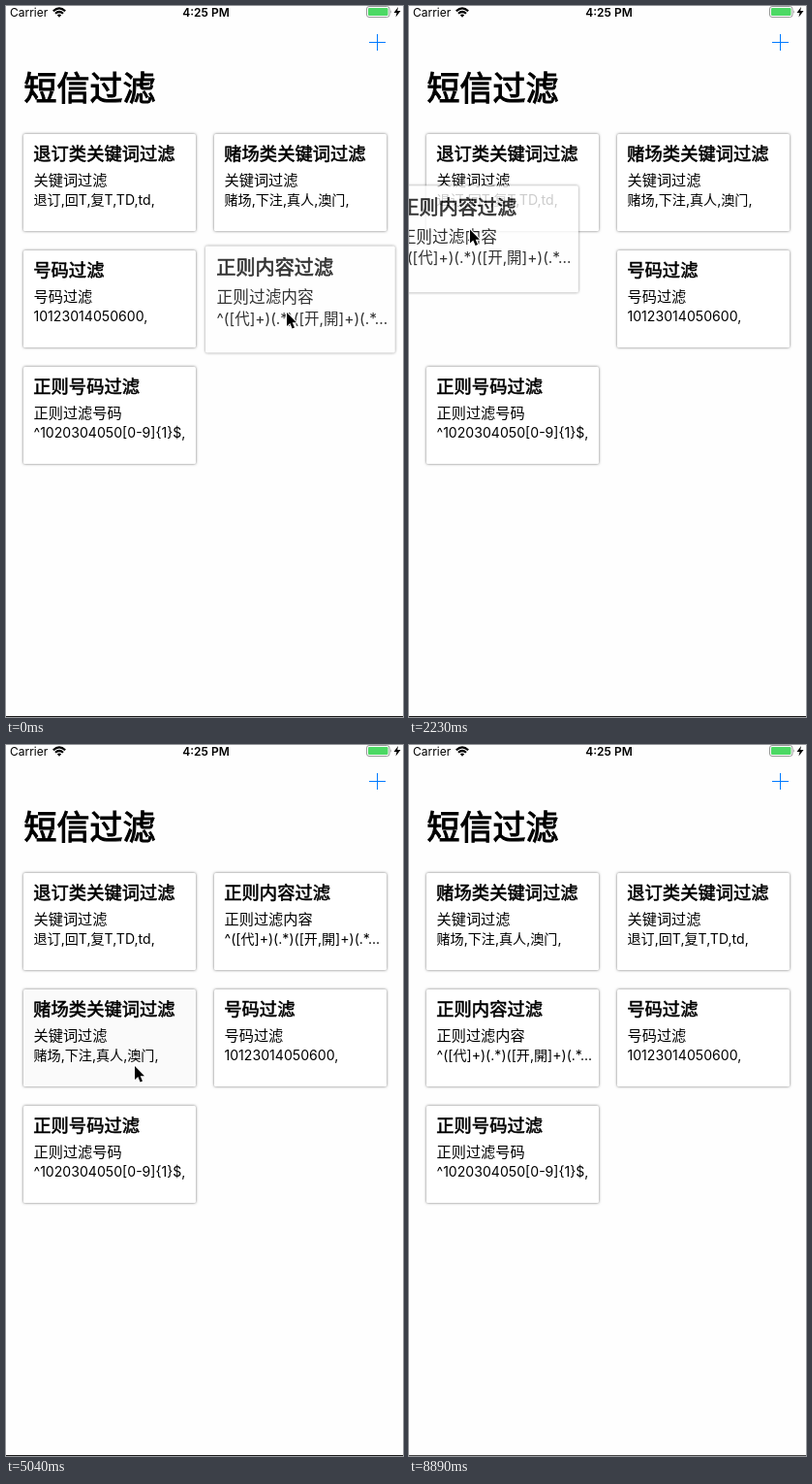
Recreate the animation shown at these times as an HTML page. Size 410x733 px, loop 8990 ms.

```html
<!DOCTYPE html>
<html lang="zh-CN">
<head>
<meta charset="utf-8">
<title>短信过滤</title>
<style>
  html, body { margin: 0; width: 100%; height: 100%; overflow: hidden; background: #fefefe; }
  svg { display: block; width: 410px; height: 733px; }
  text { font-family: Inter, "Noto Sans CJK SC", "Noto Sans CJK", sans-serif; white-space: pre; }
  .status { font-size: 12px; }
  .heading { font-size: 34px; }
  .name { font-size: 18.3px; }
  .kind { font-size: 15.2px; }
  .body { font-size: 14.1px; }
  /* A thin outline gives the medium weight that the CJK font lacks. */
  .heading, .name { stroke: #000; stroke-width: .032em; }
  .card rect { fill: #fff; filter: drop-shadow(0 0 1.6px rgba(0, 0, 0, .55)); }
  .card.pressed rect { fill: #fafafa; }
  .card.lifted { opacity: .8; }
</style>
</head>
<body>
<svg id="stage" viewBox="0 0 410 733">
  <text class="status" x="4" y="10.5">Carrier</text>
  <g fill="none" stroke="#000" stroke-width="2.2">
    <path d="M48.8 5.2Q55 -.6 61.2 5.2M51 7.8Q55 4.2 59 7.8"/>
    <path d="M52.8 9.3Q55 7.6 57.2 9.3L55 11.8Z" fill="#000" stroke="none"/>
  </g>
  <text class="status" x="206.5" y="10.5" text-anchor="middle" font-weight="600">4:25 PM</text>
  <rect x="372.5" y=".5" width="23.5" height="11" rx="2.5" fill="none" stroke="#999"/>
  <rect x="374" y="2" width="20.5" height="8" rx="1.2" fill="#4cd964"/>
  <path d="M397.2 4Q399 6 397.2 8Z" fill="#999"/>
  <path d="M405 1L400.5 7H403.5L402.5 11.5L407.5 5H404.2Z"/>
  <path d="M375 37.5H392M383.5 29V46" stroke="#007aff"/>
  <text class="heading" x="18.5" y="97">短信过滤</text>
  <rect id="edge" y="732" width="410" height="1"/>
  <path id="cursor" d="M0 0V14L3.3 11L5.6 16.5L8 15.5L5.7 10.3H10Z" stroke="#fff" paint-order="stroke" stroke-width="2"/>
</svg>
<script>
const LOOP = 8990, START = 740, REFRESH = 148.15, LAG = 55, SHIFT = 300;
const stage = document.getElementById('stage');
const cursor = document.getElementById('cursor');
const edge = document.getElementById('edge');

const cards = [
  ['退订类关键词过滤', '关键词过滤', '退订,回T,复T,TD,td,'],
  ['赌场类关键词过滤', '关键词过滤', '赌场,下注,真人,澳门,'],
  ['号码过滤', '号码过滤', '10123014050600,'],
  ['正则内容过滤', '正则过滤内容', '^([代]+)(.*)([开,開]+)(.*...'],
  ['正则号码过滤', '正则过滤号码', '^1020304050[0-9]{1}$,']
].map(makeCard);

// Turning points and rests of the pointer.
const pointer = [
  { t: 700, x: 290, y: 316 },
  { t: 1340, x: 262, y: 422 },
  { t: 1640, x: 198, y: 433 },
  { t: 2080, x: 70, y: 295 },
  { t: 2230, x: 63, y: 228 },
  { t: 2640, x: 85, y: 183 },
  { t: 3120, x: 212, y: 248 },
  { t: 3340, x: 284, y: 201 },
  { t: 3700, x: 284, y: 201 },
  { t: 4140, x: 133, y: 331 },
  { t: 6090, x: 133, y: 331 },
  { t: 6640, x: 140, y: 229 },
  { t: 6840, x: 140, y: 229 },
  { t: 7290, x: 229, y: 228 },
  { t: 7440, x: 229, y: 228 },
  { t: 7880, x: 320, y: 668 }
];

const drags = [
  { card: 3, start: 0, end: 3500, dx: -84, dy: -68.5 },
  { card: 1, start: 5040, end: 6800, dx: -124, dy: -84 }
];

// Each move takes one card to a new place in the grid.
const moves = [
  { t: 1890, card: 3, to: 2 },
  { t: 2280, card: 3, to: 0 },
  { t: 3100, card: 3, to: 1 },
  { t: 6390, card: 1, to: 0 }
];
const layouts = [{ t: -SHIFT, order: [...cards.keys()] }];
for (const { t, card, to } of moves) {
  const order = layouts.at(-1).order.filter(other => other !== card);
  order.splice(to, 0, card);
  layouts.push({ t, order });
}

function add(parent, tag, attrs) {
  const node = document.createElementNS('http://www.w3.org/2000/svg', tag);
  for (const key in attrs) node.setAttribute(key, attrs[key]);
  return parent.appendChild(node);
}

function makeCard([name, kind, body]) {
  const group = add(stage, 'g', { class: 'card' });
  add(group, 'rect', { width: 178, height: 100, rx: 1.5 });
  add(group, 'text', { class: 'name', x: 10.3, y: 26.8 }).textContent = name;
  add(group, 'text', { class: 'kind', x: 10.5, y: 53.3 }).textContent = kind;
  add(group, 'text', { class: 'body', x: 10.5, y: 72.8 }).textContent = body;
  return group;
}

const slot = i => [18 + i % 2 * 197, 132 + Math.floor(i / 2) * 120];
const mix = (a, b, p) => a + (b - a) * p;
const ease = p => p * p * (3 - 2 * p);

function slope(i, axis) {
  const rate = k => (pointer[k + 1][axis] - pointer[k][axis]) / (pointer[k + 1].t - pointer[k].t);
  if (i === 0 || i === pointer.length - 1) return 0;
  const before = rate(i - 1), after = rate(i);
  return before * after > 0 ? (before + after) / 2 : 0;
}

// Hermite curve that comes to a halt at every turning point.
function pointerAt(t) {
  t = Math.min(Math.max(t, pointer[0].t), pointer.at(-1).t);
  const i = Math.max(1, pointer.findIndex(key => key.t >= t));
  const a = pointer[i - 1], b = pointer[i], span = b.t - a.t, p = (t - a.t) / span, q = 1 - p;
  return ['x', 'y'].map(axis => mix(a[axis], b[axis], ease(p))
    + span * p * q * (q * slope(i - 1, axis) - p * slope(i, axis)));
}

function gridPosition(card, t) {
  const now = layouts.findLastIndex(layout => layout.t <= t);
  const from = slot(layouts[Math.max(0, now - 1)].order.indexOf(card));
  const to = slot(layouts[now].order.indexOf(card));
  const p = ease(Math.min(1, (t - layouts[now].t) / SHIFT));
  return from.map((value, axis) => mix(value, to[axis], p));
}

function draw(t) {
  const drag = drags.find(d => t >= d.start && t < d.end);
  cards.forEach((group, i) => {
    const lifted = drag?.card === i;
    let [x, y] = gridPosition(i, t);
    if (lifted) {
      const [px, py] = pointerAt(t - LAG);
      x = px + drag.dx;
      y = py + drag.dy;
      stage.append(group);
    }
    group.classList.toggle('lifted', lifted);
    group.classList.toggle('pressed', i === 1 && t >= 4400 && t < 5040);
    group.setAttribute('transform', `translate(${x} ${y}) scale(${lifted ? 1.1 : 1})`);
  });
  cursor.setAttribute('transform', `translate(${pointerAt(t)})`);
  cursor.style.display = t < 7950 ? '' : 'none';
  edge.setAttribute('fill', t < 8800 ? '#1a1a1a' : '#444');
  stage.append(cursor);
}

// The picture holds still until START, then refreshes at a steady beat.
const beat = t => t < START ? 0 : START + Math.floor((t - START) / REFRESH) * REFRESH;

let shown = -1;
const origin = performance.now();
function tick() {
  const time = beat((performance.now() - origin) % LOOP);
  if (time !== shown) draw(shown = time);
  requestAnimationFrame(tick);
}
tick();
</script>
</body>
</html>
```
